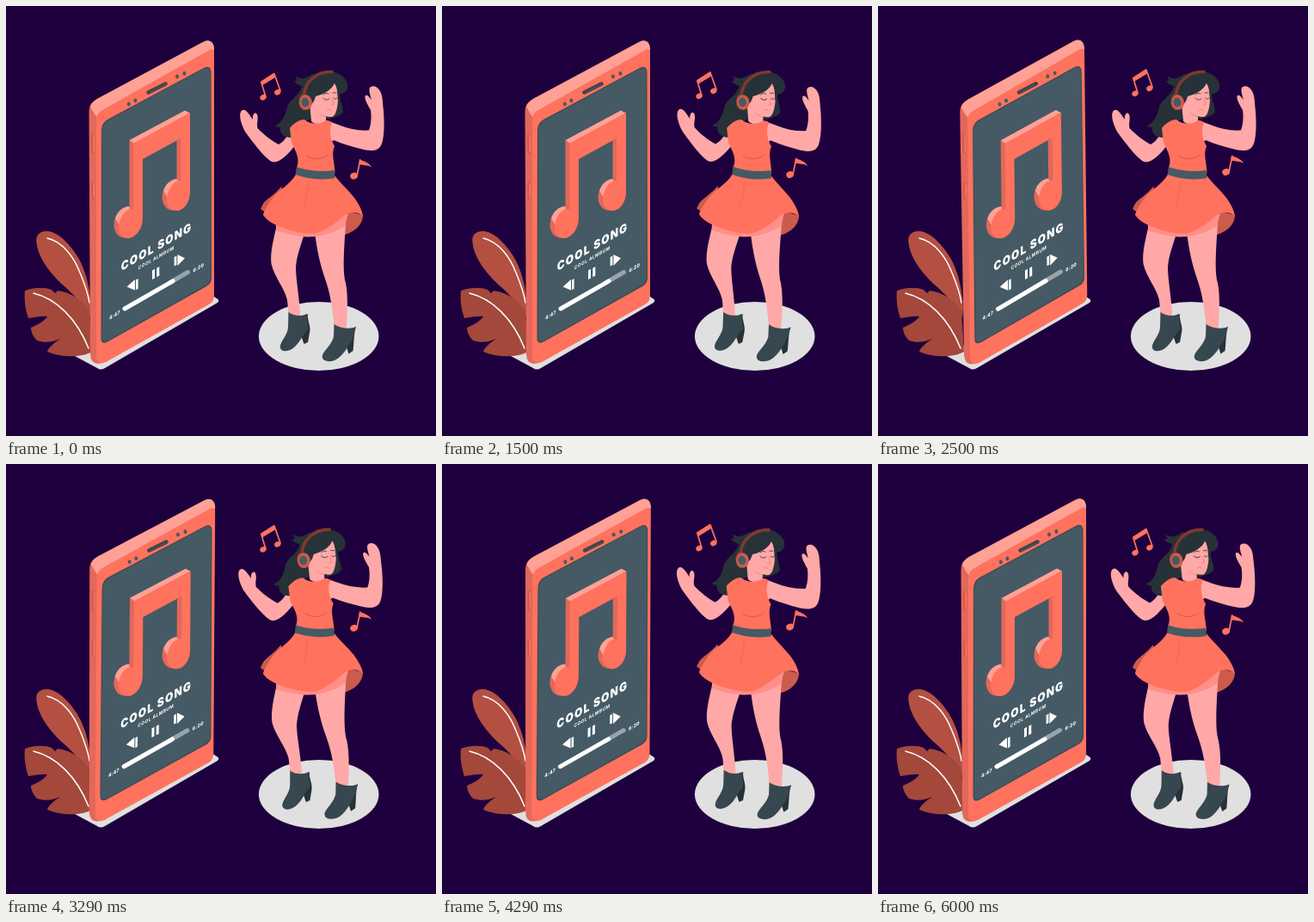
An HTML page with a canvas that plays this animation: 500 by 500 pixels, repeating every 6.04 s.

```html
<!DOCTYPE html>
<html lang="en">
<head>
<meta charset="utf-8">
<title>Dance to the song</title>
<style>
html, body { margin: 0; width: 100%; height: 100%; overflow: hidden; background: #1f003e; }
canvas { display: block; width: 500px; height: 500px; }
</style>
</head>
<body>
<canvas id="stage"></canvas>
<script>
const LOOP = 6040;
const CORAL = '#ff725e', LIGHT = '#ffa195', DEEP = '#e3685a', SHADE = '#cc5b4b';
const SLATE = '#455a64', INK = '#263238', SKIN = '#ffa8a7', GREY = '#e0e0e0';

const canvas = document.getElementById('stage');
const ratio = window.devicePixelRatio || 1;
canvas.width = canvas.height = 500 * ratio;
const c = canvas.getContext('2d');

const cache = new Map();
function path(d) {
  if (!cache.has(d)) cache.set(d, new Path2D(d));
  return cache.get(d);
}
function fill(color, d) {
  c.fillStyle = color;
  c.fill(path(d));
}
function line(color, width, d) {
  c.strokeStyle = color;
  c.lineWidth = width;
  c.lineCap = c.lineJoin = 'round';
  c.stroke(path(d));
}
function oval(color, x, y, rx, ry = rx, turn = 0) {
  c.fillStyle = color;
  c.beginPath();
  c.ellipse(x, y, rx, ry, turn, 0, Math.PI * 2);
  c.fill();
}
// Text lying on the isometric screen plane, centred on x
function isoText(text, x, y, size, weight, spacing) {
  c.save();
  c.transform(0.866, -0.5, 0, 1, x, y);
  c.font = `${weight} ${size}px Inter, Roboto, sans-serif`;
  c.letterSpacing = spacing + 'px';
  c.textAlign = 'center';
  c.fillStyle = '#fff';
  c.fillText(text, 0, 0);
  c.restore();
}

// Linear 0, 1, 0, -1, 0 swing
function swing(t, period) {
  if (t < 0) return 0;
  const p = (t % period) / period;
  return p < 0.25 ? p * 4 : p < 0.75 ? 2 - p * 4 : p * 4 - 4;
}
// Linear 0, 1, 0 lift
function lift(t, period) {
  if (t < 0) return 0;
  return 1 - Math.abs(1 - (t % period) / period * 2);
}
function tilted(degrees, x, y, draw) {
  c.save();
  c.translate(x, y);
  c.rotate(degrees * Math.PI / 180);
  c.translate(-x, -y);
  draw();
  c.restore();
}

function floor() {
  oval(GREY, 363.7, 384, 69.8, 40);
  fill(GREY, 'M80 407L106 421Q110 424 115 421L246 345Q249 342 245 340L236 334L90 400Z');
}

function plant() {
  fill('#b35042', 'M35.5 275C34 266 40 261 50 262C64 265 75 279 83 291C92 306 98 326 99 352L98 362C89 347 79 336 68 326C51 311 37 292 35.5 275Z');
  line('#fff', 1.5, 'M48 270C66 274 79 292 86 310C91 322 95 332 97 345');
  fill('#a3483b', 'M22 331C33 327 46 327 53 330L57 334L60 331C76 333 88 342 97 354L100 402C88 409 64 409 48 402C50 396 56 392 63 387C54 391 46 392 36 389C31 384 29 378 29 374C38 370 45 366 48 361C42 360 34 362 26 363C22 351 21 340 22 331Z');
  line('#fff', 1.5, 'M32 334C58 340 82 363 96 398');
}

function bigNote() {
  oval(DEEP, 140.5, 252, 14.5, 18, 0.35);
  fill(LIGHT, 'M127 247C129 239 137 232 144 233L148 238L132 255Z');
  oval(DEEP, 196.5, 220, 14.5, 18, 0.35);
  fill(LIGHT, 'M183 215C185 207 193 200 200 201L204 206L188 223Z');
  fill(DEEP, 'M143.5 156L149 160L149 240L143.5 236Z');
  fill(LIGHT, 'M143.5 156L208 121.5L214 124.5L149 160Z');
  fill(DEEP, 'M198.5 156.5L203 154L203 206L198.5 202Z');
  fill(CORAL, 'M148.5 159.5L214 124.5L214 216C214 230 205 239 197 238C189 237 185 229 188 219C191 208 198 202 203 204L203 154L159 178L159 246C159 260 150 270 142 270C133 270 129 261 132 251C135 240 143 234 148.5 237Z');
}

function phone() {
  fill(DEEP, 'M96.5 124C96.5 116 99 112 106 108L229 42Q241 37 242 50L117 413.5Q98.5 421 98 405Z');
  fill(LIGHT, 'M98 117C99 113 102 111 106 108L229 42C236 38 241.5 41 242 50L240 60L107 131Q102 125 98 117Z');
  fill(CORAL, 'M105 133C105 127 108 123 112 121L235 52Q242 48 242 55L242 336Q242 344 236 347L117 413.5Q105.5 419 105 407Z');
  line(SHADE, 3.4, 'M100.8 149.500L101.3 169.500');
  line(SHADE, 3.4, 'M101 206L101.3 223');
  line(CORAL, 1.6, 'M101.8 150L102.2 169M102 206.500L102.2 222.500');

  fill('#3a4b54', 'M111 147C111 139 113 135 119 131.500L230 72Q238 68 238.5 77L239 316Q239 323 233 326L119 390Q110 395 110.5 385Z');
  fill(SLATE, 'M112 148C112 140 114 136 120 132.500L230 73.3Q237 70 237.5 78L238 315Q238 321 232 324.8L119 388.8Q111.7 392 111.7 385Z');

  line('#37474f', 4.5, 'M165.5 100.5L185.5 90.5');
  line('#5d4b50', 1.2, 'M166 101L185 91.4');
  oval(SLATE, 142.8, 114, 2, 2.4);
  oval(SLATE, 150.4, 110, 2, 2.4);
  oval(SLATE, 199, 82, 2, 2.4);
  oval(SLATE, 207.4, 78.5, 2, 2.4);

  bigNote();
  isoText('COOL SONG', 175, 284.6, 13.9, 900, 1.3);
  isoText('COOL ALMBUM', 174.7, 294.6, 5.6, 700, 0.5);

  fill('#fff', 'M140.5 326.5L150 318L150 330.5ZM151 318.4L153.6 317L153.6 328.8L151 330.2Z');
  fill('#fff', 'M170 307.500L173 305.8L173 316.4L170 318.1ZM175.3 304.7L178.3 303L178.3 313.6L175.3 315.3Z');
  fill('#fff', 'M195.6 292L198.4 290.4L198.4 301L195.6 302.6ZM199.4 289L208 293.2L199.4 302Z');
  line('#98a4aa', 5, 'M190 322L211.5 309.5');
  line('#fff', 5, 'M138 352L194 319.8');
  isoText('4:47', 126.3, 361.3, 5.8, 800, 0.3);
  isoText('6:20', 223.8, 306.2, 5.8, 800, 0.3);
}

function smallNotes() {
  fill(CORAL, 'M296 87.7L311.8 77.6L313.2 83L297.6 92.6Z');
  line(CORAL, 1.7, 'M296.8 88.5L301.8 105M312 79L319 98.500');
  oval(CORAL, 299, 106.2, 3.8, 3.1, -0.5);
  oval(CORAL, 315.8, 100.2, 3.8, 3.1, -0.5);
  oval(CORAL, 404.6, 197.6, 4.4, 3.8, -0.4);
  line(CORAL, 1.7, 'M408.2 197L411.8 179');
  fill(CORAL, 'M411 178C415 181 422 181 425 187.5C420 184 415 186 410.4 184Z');
}

function legs() {
  fill(SHADE, 'M396 238L415 243C415 252 408 263 390 267Z');
  fill(SKIN, 'M315 254C311 272 307 286 308.500 300C312 315 324 328 327 342C328 350 328 356 328.500 363L342.500 365C341.500 340 337 318 337 304C338 290 343 278 349 258Z');
  fill(SKIN, 'M358 252C360 276 364 297 371 317C378 337 380 355 382 378L395.500 378C397 356 398 338 395 322C391 308 393 282 396 240Z');
  fill('#ff8f88', 'M314 254L398 240L394 256C384 262 373 266 362 268L351 268.500C338 268 325 265 314 261Z');

  fill(INK, 'M340 364L351 358C350 366 355 372 353 380L351 391L346.500 393L343 383Z');
  fill('#37474f', 'M328.500 356C335 361 344 361 350 358C349 365 352 371 351 376C345 381 343 390 336 396C330 402 321 403 319 398C317 392 327 384 328 374Z');
  fill(INK, 'M394 380L407 373C404 382 405 390 403.500 401L398.500 404.500L395 394Z');
  fill('#37474f', 'M381.500 370C388 375 400 376 407 373C404 381 404 386 401 390C397 397 394 403 387 409C380 415 369 414 368 409C366 403 379 395 381 384Z');
}

function arms() {
  fill(SKIN, 'M333 138C329 148 325 157 317 161C309 157 299 149 292.5 142C291 137 294 131 292 126C290 122 286 126 287 132C283 126 278 118 274 121.500C270 125 273 137 278 146C286 157 300 176 309 181C318 184 329 171 338 160Z');
  fill(SKIN, 'M368 132C380 134 398 146 422 144.500C425 137 425 127 424 121C420 114 416 107 418 104C421 103 423 107 425 109C423 102 421 96 424 94C428 92 433 94 436 101C438 106 438 113 439 122C440 137 440 151 437 160C434 169 425 169 416 167C404 164 393 161 381 156L376 160Z');
}

function dress() {
  fill(SHADE, 'M320 210C312 220 302 225 299 230L296 236L303 241L326 222Z');
  fill(CORAL, 'M337 196C330 208 317 214 310 223C304 232 299 240 299 243C305 253 324 260 345 264C352 265 358 265 362 264C377 258 388 248 397 241C404 239 410 240 415 244C414 237 410 230 405 223C396 212 389 206 383 198Z');
  line('#f0604f', 0.8, 'M351 205C351 218 348 225 346 234');
  fill(CORAL, 'M330 142C336 135 342 132 347 132C352 137 365 139 372 133C375 133 378 134 379 135.500C375 145 377 154 382 163C378 172 382 181 382.5 194C368 197 351 194 337.500 189C343 177 336 168 332 159Z');
  line(SHADE, 0.9, 'M349 174C357 179 367 179 374 173');
  fill(SLATE, 'M338 187C350 192 368 193 382 191L382.5 200C367 203 350 201 336.500 196Z');
}

function head() {
  fill(INK, 'M357 79C350 83 346 85 342 84L336 82C339 86 339 88 334.500 87C336 90 340 92 344 93C342 104 330 108 327 117C325 128 321 136 313 139C315 141 317 141 319 141C318 151 327 154 336 153C347 150 342 139 352 132L372 132C382 130 392 127 392 122C391 114 387 108 389 101L378 90Z');
  fill(SKIN, 'M353 112L355 134C360 139 369 138 372 133L372 122Z');
  fill('#ff8f88', 'M360 120L373 126L372 129C366 129 362 125 360 120Z');
  fill(SKIN, 'M355 101C357 89 370 83 381 89C386 93 385 103 386 111C385 121 383 129 378 129C369 129 358 123 355 114Z');
  fill(INK, 'M352 107C346 94 352 81 365 76.500C378 74 392 78 396.500 89C399 96 395 102 389 102C385 99 385 94 382 89C380 97 369 103 360 105C359 109 357 114 354 114Z');

  line(INK, 0.9, 'M369 107C371 110 374 109 376 108M381 107C383 109 384 108 385 107');
  line(INK, 0.8, 'M369 103C371 101 373 101 375 102M380 101L384 101');
  line('#ee716b', 0.7, 'M379 108L381 115L378 115M373 121C375 120 377 120 378 122');

  line('#7f392f', 3.6, 'M346.5 103C348 88 361 76 379 76.500');
  oval('#7f392f', 345.5, 111.8, 5, 9.2, -0.1);
  oval(SHADE, 348.5, 112, 7.4, 8.8, -0.1);
  oval(SLATE, 347.8, 112, 4.4, 5.3, -0.1);
}

function dancer() {
  legs();
  arms();
  head();
  dress();
}

function frame(now) {
  const t = now % LOOP;
  c.setTransform(ratio, 0, 0, ratio, 0, 0);
  c.fillStyle = '#1f003e';
  c.fillRect(0, 0, 500, 500);
  floor();
  plant();
  tilted(swing(t, 3000), 169, 228, phone);
  c.save();
  c.translate(0, -9 * lift(t - 1000, 6000));
  smallNotes();
  c.restore();
  tilted(swing(t - 1000, 3000), 356, 244, dancer);
}

const start = performance.now();
function tick() {
  frame(performance.now() - start);
  requestAnimationFrame(tick);
}
tick();
</script>
</body>
</html>
```
